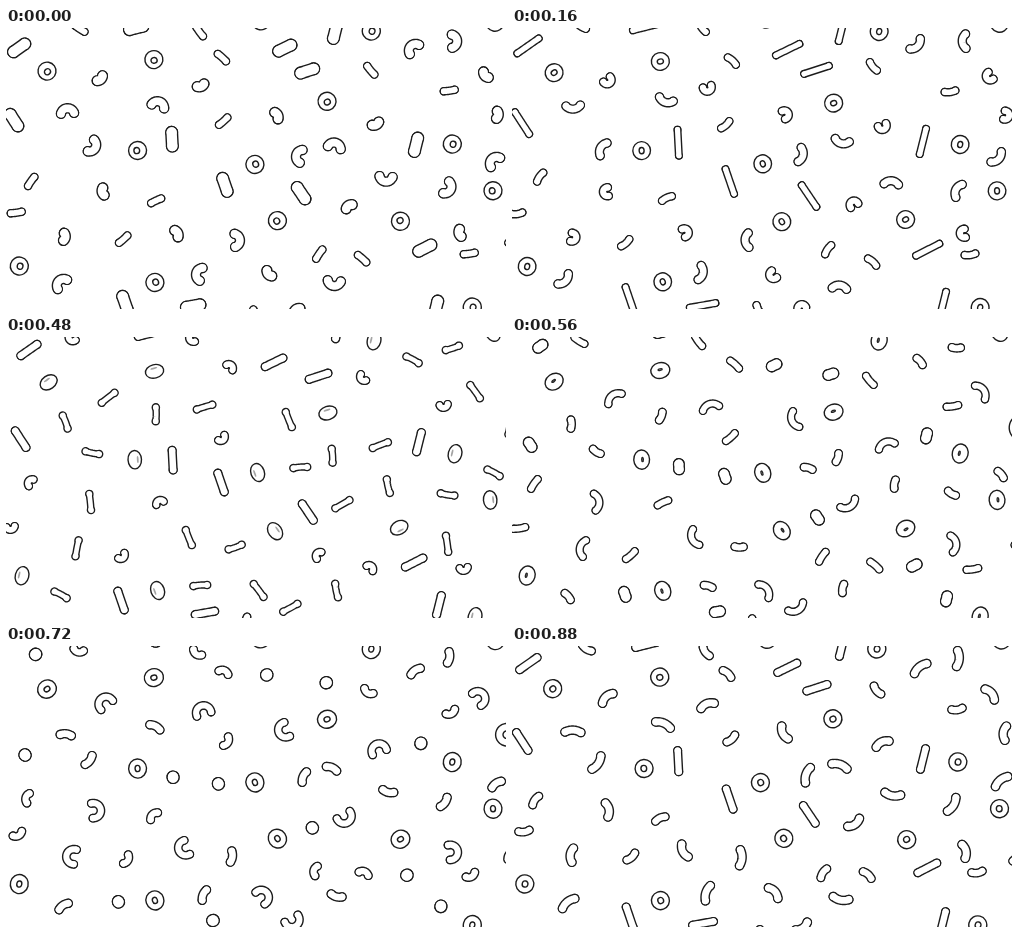
Recreate the animation shown at these times as an HTML page. Size 500 px wide and 281 px high, loop 0.96 s.

```html
<!DOCTYPE html>
<html lang="en">
<head>
<meta charset="utf-8">
<title>Tumbling pasta</title>
<style>
  html, body { margin: 0; width: 100%; height: 100%; overflow: hidden; background: #fff; }
  svg { display: block; width: 100vw; height: 100vh; }
  path, ellipse { fill: none; stroke: #1c1c1c; stroke-linecap: round; stroke-linejoin: round; }
  .body { stroke: #fff; }
</style>
</head>
<body>
<svg id="stage" viewBox="0 0 500 281" preserveAspectRatio="none"><defs><g id="bunch"></g></defs></svg>
<script>
const NS = 'http://www.w3.org/2000/svg';
const STEP = 80, STEPS = 12, LINE = 1.4;
const stage = document.getElementById('stage');
const bunch = document.getElementById('bunch');
const rad = deg => deg * Math.PI / 180;

// The same bunch of five pieces lies at each spot: x, y, turn
const spots = [
  [13, 20, -35], [279, 20, 154], [301, 43, -18], [166, 111, 87], [219, 157, -109],
  [295, 165, 56], [410, 117, -76], [8, 92, 57], [419, 220, 153], [119, 275, -109],
  [187, 278, -10], [430, 280, -76], [329, 4, -76], [130, 0, -14], [521, 150, 85],
  [-23, 239, -76], [513, -33, 57], [366, 325, 154]
];

// Periodic curves over the loop, in steps
let step = 0;
const gap = at => {
  const d = Math.abs(step - at) % STEPS;
  return Math.min(d, STEPS - d);
};
const hill = (at, width) => Math.exp(-((gap(at) / width) ** 2));
const plateau = (at, width) => Math.exp(-((gap(at) / width) ** 4));
const swing = (mid, reach, peak) => mid + reach * Math.cos(2 * Math.PI * (step - peak) / STEPS);

function rod() {
  const endOn = hill(8.2, 1.7);
  return {
    x: 23 * hill(8.2, 2.2) + 7 * hill(4, 2.5) - 1.5 * hill(0, 1),
    length: Math.max(0.5, 26 - 34 * endOn - 12 * hill(0, 0.8)),
    width: 6.6 + 6.5 * endOn + 5 * hill(0, 0.7)
  };
}

function stub() {
  const blob = hill(4, 1);
  return {
    x: swing(1.8, 5.3, 4.2),
    y: swing(-2.6, 3.2, 0.8),
    axis: -20 * hill(9, 1),
    length: 11 - 4 * blob + hill(8, 1.5),
    bend: 185 * plateau(5, 1.5) + 120 * hill(9.5, 1.6) + 35 * hill(2, 1),
    width: 7 + 2.5 * blob + hill(10, 1.3),
    crease: blob > 0.8 ? 4 : 0
  };
}

function elbow() {
  return {
    x: swing(2, 4, 8.7),
    y: swing(2.5, 2.7, 8),
    axis: -62 + 92 * hill(6.7, 1.2) - 12 * hill(1, 1.5),
    length: swing(13, 5, 0.5) + 6 * hill(5.8, 0.8),
    bend: 150 * hill(0, 0.9) + 60 * hill(8.5, 2.2) - 150 * hill(2.9, 1.5),
    width: 8 - 2 * hill(6, 0.9) + hill(0, 0.8),
    lobe: 1.2 * hill(6, 0.6)
  };
}

function horn() {
  return {
    y: swing(5.2, 6.3, 6),
    axis: -6 * hill(11.5, 1),
    length: 15 + 12 * hill(8.6, 1.7) - 7 * hill(0, 0.8),
    bend: 200 * plateau(8.9, 2.2) - 200 * plateau(2.4, 2.6),
    width: 7.4 - 1.4 * hill(6, 0.9) + 2.3 * hill(0, 1),
    lobe: 1.2 * hill(6, 0.6)
  };
}

function ring() {
  return {
    y: swing(1.7, 2, 4.5),
    rx: 9 + 0.8 * hill(8, 1.8),
    ry: 9 - 2.7 * hill(5.2, 1.9),
    holeX: 3.1 - hill(7, 0.8),
    holeY: Math.max(0.2, 2.9 - 3 * hill(5.5, 2.5)),
    holeAt: 0.8 * hill(0, 1) - 3 * hill(6, 0.9),
    opacity: 1 - 0.6 * hill(6, 0.6)
  };
}

function set(el, attrs) {
  for (const key in attrs) el.setAttribute(key, attrs[key]);
}

function add(parent, tag, attrs = {}) {
  const el = document.createElementNS(NS, tag);
  set(el, attrs);
  return parent.appendChild(el);
}

const place = (x, y, turn) => ({ transform: `translate(${x} ${y}) rotate(${turn})` });

// An arc-shaped tube: a dark rim under a white body
function tube(pose, x0, y0, turn) {
  const g = add(add(bunch, 'g', place(x0, y0, turn)), 'g');
  const rim = add(g, 'path'), rimEnds = add(g, 'path');
  const body = add(g, 'path', { class: 'body' }), bodyEnds = add(g, 'path', { class: 'body' });
  const fold = add(g, 'path', { 'stroke-width': LINE });

  return () => {
    const { x = 0, y = 0, axis = 0, length, bend = 0, width, lobe = 0, crease = 0 } = pose();
    const b = rad(bend), r = length / b, points = [];
    for (let s = -0.5; s <= 0.5; s += 1 / 16) {
      const p = Math.abs(bend) < 1
        ? [s * length, 0]
        : [r * Math.sin(s * b), r * ((1 + Math.cos(b / 2)) / 2 - Math.cos(s * b))];
      points.push(p.map(v => v.toFixed(2)).join(' '));
    }
    const line = 'M' + points.join('L');
    const ends = `M${points[0]}h.01M${points[16]}h.01`;
    set(g, place(x, y, axis));
    set(rim, { d: line, 'stroke-width': width + LINE });
    set(rimEnds, { d: ends, 'stroke-width': width + lobe + LINE });
    set(body, { d: line, 'stroke-width': width - LINE });
    set(bodyEnds, { d: ends, 'stroke-width': width + lobe - LINE });
    set(fold, { d: crease ? `M0 ${width * 0.35}q.3 ${-crease * 0.7} 2.5 ${-crease}` : '' });
  };
}

function disc(pose, x0, y0) {
  const g = add(bunch, 'g', { 'stroke-width': LINE });
  const outer = add(g, 'ellipse'), hole = add(g, 'ellipse');
  return () => {
    const { y, rx, ry, holeX, holeY, holeAt, opacity } = pose();
    set(g, place(x0, y0 + y, 0));
    set(outer, { rx, ry });
    set(hole, { rx: holeX, ry: holeY, cy: holeAt, opacity });
  };
}

const pieces = [
  tube(rod, 0, 0, 0),
  disc(ring, 9.7, 34.7),
  tube(stub, 60, 18, 248),
  tube(elbow, 5, 78, 101),
  tube(horn, 49, 73, -3)
];
for (const spot of spots) add(stage, 'use', { href: '#bunch', ...place(...spot) });

const start = performance.now();
let shown = -1;
function tick() {
  step = Math.floor((performance.now() - start) / STEP) % STEPS;
  if (step !== shown) {
    shown = step;
    pieces.forEach(update => update());
  }
  requestAnimationFrame(tick);
}
tick();
</script>
</body>
</html>
```
